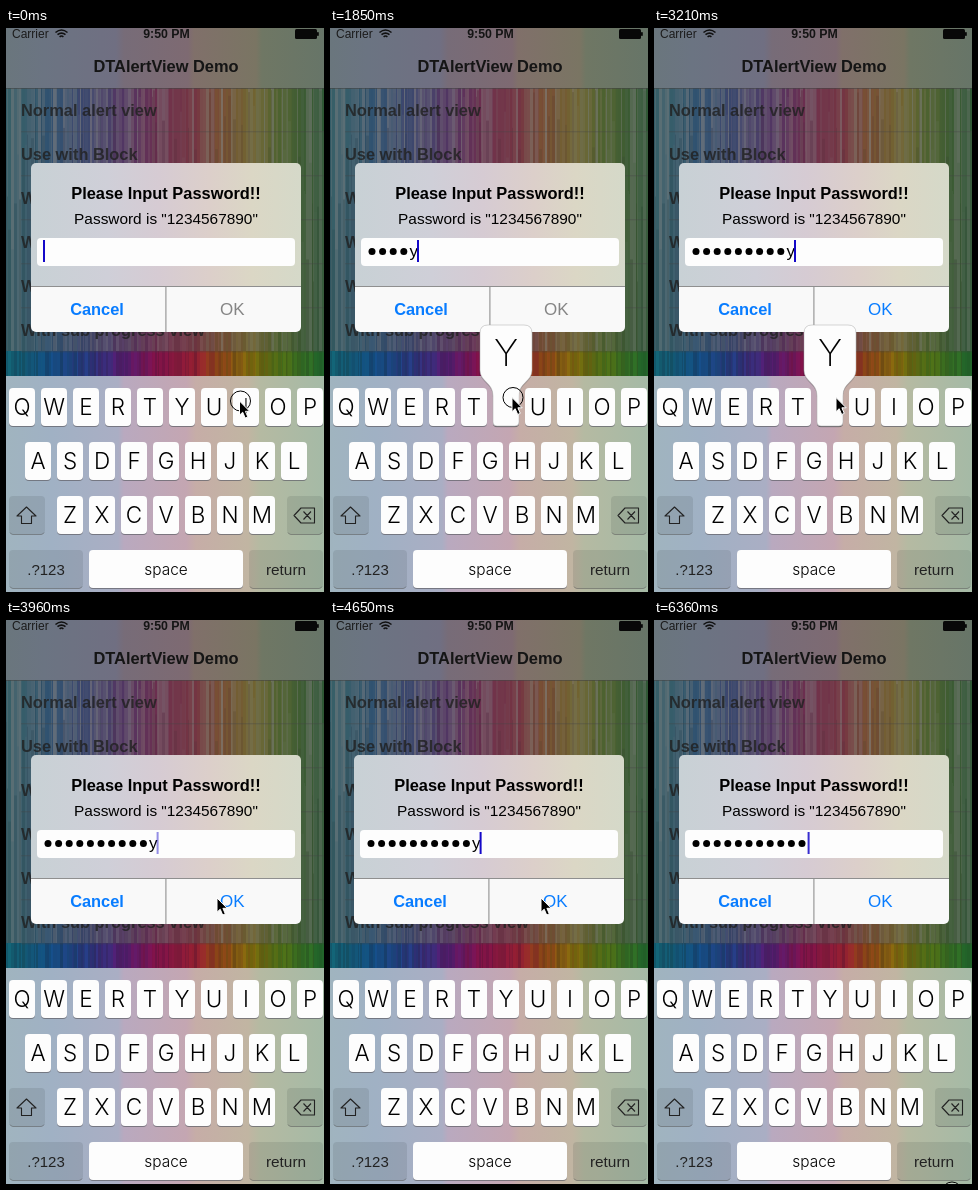
Write an HTML page that moves like this. It is 318 by 564 pixels and loops after 6420 ms.

```html
<!DOCTYPE html>
<html lang="en">
<head>
<meta charset="utf-8">
<title>DTAlertView Demo</title>
<style>
  html, body { margin: 0; width: 100%; height: 100%; overflow: hidden; }
  svg { display: block; width: 318px; height: 564px; font-family: "Liberation Sans", Arial, sans-serif; }
</style>
</head>
<body>
<svg id="stage" viewBox="0 0 318 564" xmlns="http://www.w3.org/2000/svg"></svg>
<script>
const LOOP = 6420;
const stage = document.getElementById('stage');

function add(parent, tag, attrs, content) {
  const node = document.createElementNS('http://www.w3.org/2000/svg', tag);
  for (const key in attrs) node.setAttribute(key, attrs[key]);
  if (content) node.textContent = content;
  parent.appendChild(node);
  return node;
}
const group = (parent = stage, attrs = {}) => add(parent, 'g', attrs);
const rect = (parent, x, y, width, height, fill, more) =>
  add(parent, 'rect', { x, y, width, height, fill, ...more });
const label = (parent, content, x, y, size, more) =>
  add(parent, 'text', { x, y, 'font-size': size, ...more }, content);
const centered = { 'text-anchor': 'middle' };
const bold = { 'font-weight': 700 };
const light = { 'font-family': 'Inter, Roboto, sans-serif', 'font-weight': 300 };

function gradient(id, stops) {
  const g = add(stage, 'linearGradient', { id });
  stops.forEach(([x, color]) => add(g, 'stop', { offset: x / 318, 'stop-color': color }));
  return `url(#${id})`;
}

let seed = 7;
function random() {
  seed = (seed * 16807) % 2147483647;
  return seed / 2147483647;
}

const lerp = (a, b, u) => a + (b - a) * u;

// Piecewise-linear track; each point is [time, ...values].
function track(points, t) {
  if (t <= points[0][0]) return points[0].slice(1);
  for (let i = 1; i < points.length; i++) {
    const a = points[i - 1], b = points[i];
    if (t < b[0]) {
      const u = (t - a[0]) / (b[0] - a[0]);
      return a.slice(1).map((v, k) => lerp(v, b[k + 1], u));
    }
  }
  return points[points.length - 1].slice(1);
}

function drawStripes() {
  const palette = [
    [0, 48, 92, 102], [45, 48, 82, 112], [85, 62, 66, 108], [115, 84, 52, 98],
    [150, 108, 46, 78], [190, 118, 54, 64], [212, 120, 78, 52], [245, 112, 102, 48],
    [275, 78, 98, 48], [318, 44, 86, 54]
  ];
  const mix = (color, tone, amount) =>
    `rgb(${color.map(v => Math.round(lerp(v, tone, amount)))})`;
  const saturate = (color, amount) => {
    const mean = (color[0] + color[1] + color[2]) / 3;
    return color.map(v => Math.max(0, mean + (v - mean) * amount));
  };
  const layer = group();
  for (let x = 0; x < 318;) {
    const width = 1 + Math.floor(random() * 3);
    const color = track(palette, x + random() * 12 - 6);
    const pale = random() ** 2 * 0.6;
    rect(layer, x, 60, width, 264, mix(color, 128, pale));
    const top = 60 + random() * 200;
    rect(layer, x, top, width, 324 - top, mix(color, random() < 0.5 ? 130 : 45, 0.25), { opacity: 0.45 });
    rect(layer, x, 323, width, 25, mix(saturate(color, 1.9), 20, random() * 0.25));
    x += width;
  }
}

function drawPage() {
  rect(stage, 0, 0, 318, 60, gradient('bar', [
    [0, '#6a767d'], [38, '#6b7482'], [110, '#706f82'], [118, '#776c78'],
    [182, '#7e6a72'], [188, '#80706a'], [250, '#7a7563'], [256, '#6f7764'], [318, '#677568']
  ]));
  rect(stage, 0, 60, 318, 0.6, '#444');
  label(stage, 'Carrier', 6, 10, 12, { fill: '#1c1c1c' });
  label(stage, '9:50 PM', 160.5, 10, 12.3, { ...centered, ...bold, fill: '#151515' });
  add(stage, 'path', {
    d: 'M49.5 4.5Q55.5 -.5 61.5 4.5M51.5 6.7Q55.5 3.4 59.5 6.7M53.6 8.8Q55.5 7.2 57.4 8.8',
    fill: 'none', stroke: '#111', 'stroke-width': 1.6
  });
  rect(stage, 289, 1, 22, 10, '#080808', { rx: 1.5 });
  rect(stage, 311, 4.2, 1.8, 3.6, '#080808');
  label(stage, 'DTAlertView Demo', 160, 44, 16.4, { ...centered, ...bold, fill: '#151515' });

  const rows = ['Normal alert view', 'Use with Block', 'W', 'W', 'W', 'With sub progress view'];
  rows.forEach((row, i) => {
    label(stage, row, 15, 88 + 44 * i, 16.4, { ...bold, fill: '#202020', opacity: 0.8 });
    rect(stage, 15, 103.5 + 44 * i, 303, 0.7, '#444', { opacity: 0.6 });
  });
}

function drawAlert() {
  const alert = group();
  add(alert, 'clipPath', { id: 'panel' }).innerHTML =
    '<rect x="25" y="135" width="270" height="169" rx="5"/>';
  const panel = group(alert, { 'clip-path': 'url(#panel)' });
  rect(panel, 25, 135, 270, 124, gradient('glass', [
    [0, '#c8d1d5'], [90, '#cfcfd8'], [150, '#d6cbd3'], [210, '#dccfca'], [260, '#dbd7c5'], [318, '#d5d9c9']
  ]));
  rect(panel, 25, 259, 270, 45, '#f9f9f9');
  rect(panel, 25, 258, 270, 1, '#8f8f8f');
  rect(panel, 159.3, 259, 1.2, 45, '#999');
  label(alert, 'Please Input Password!!', 160, 171, 16.4, { ...centered, ...bold });
  label(alert, 'Password is "1234567890"', 160, 196, 15.4, centered);
  rect(alert, 31, 210, 258, 28, '#fdfdfd', { rx: 4 });
  label(alert, 'Cancel', 91, 287, 16.4, { ...centered, ...bold, fill: '#087cff' });
  return alert;
}

function drawKey(x, y, width, content, size = 22.5) {
  rect(stage, x, y + 1, width, 38, '#65656c', { rx: 4, opacity: 0.75 });
  rect(stage, x, y, width, 38, '#fdfdfd', { rx: 4 });
  label(stage, content, x + width / 2, y + 19 + size * 0.36, size, { ...centered, ...light });
}

// Function keys only tint the board behind them.
function drawTintedKey(x, y, width, content = '', size = 15.4) {
  rect(stage, x, y, width, 38, '#20242c', { rx: 4, opacity: 0.11 });
  add(stage, 'path', {
    d: `M${x + 1} ${y + 36.5}q1 2 3 2h${width - 8}q2 0 3 -2`,
    fill: 'none', stroke: '#555', 'stroke-width': 0.9, opacity: 0.6
  });
  label(stage, content, x + width / 2, y + 24.5, size, { ...centered, fill: '#222' });
}

function drawKeyboard() {
  rect(stage, 0, 348, 318, 216, gradient('board', [
    [0, '#a0b4bf'], [45, '#a0b1c4'], [112, '#aaaec4'], [118, '#b9a9bf'],
    [180, '#c4a6b2'], [190, '#c6ada7'], [242, '#c1b5a2'], [254, '#b5baa2'], [318, '#a5baa6']
  ]));
  [['QWERTYUIOP', 3, 360], ['ASDFGHJKL', 19, 414], ['ZXCVBNM', 51, 468]].forEach(([letters, x, y]) =>
    [...letters].forEach((letter, i) => drawKey(x + 32 * i, y, 26, letter)));
  drawTintedKey(3, 468, 36);
  drawTintedKey(281, 468, 36);
  drawTintedKey(3, 522, 74, '.?123', 15);
  drawKey(83, 522, 154, 'space', 15.4);
  drawTintedKey(243, 522, 74, 'return');
  const line = { fill: 'none', stroke: '#222', 'stroke-width': 1.1, 'stroke-linejoin': 'round' };
  add(stage, 'path', { d: 'M20.5 479L30 488H25.5V495.5H15.5V488H11Z', ...line });
  add(stage, 'path', { d: 'M288 487.5L295 480H308.5V495H295ZM297.5 483.5L305 491.5M305 483.5L297.5 491.5', ...line });
}

function drawPopup() {
  const popup = group();
  const shape = 'M158 297H194Q202 297 202 305V342C202 354 189 354 189 368V394Q189 398 185 398H167' +
    'Q163 398 163 394V368C163 354 150 354 150 342V305Q150 297 158 297Z';
  add(popup, 'path', { d: shape, fill: '#444', opacity: 0.35, transform: 'translate(0 1.2)' });
  add(popup, 'path', { d: shape, fill: '#fdfdfd', stroke: '#aaa', 'stroke-width': 0.5 });
  label(popup, 'Y', 176, 338, 37, { ...centered, ...light, 'font-weight': 200 });
  return popup;
}

drawStripes();
drawPage();
const alertBox = drawAlert();
const okLabel = label(alertBox, 'OK', 226.3, 287, 17, centered);
const dots = Array.from({ length: 11 }, (_, i) =>
  add(alertBox, 'circle', { cx: 42 + 10.6 * i, cy: 223.6, r: 3.5 }));
const lastLetter = label(alertBox, 'y', 0, 229, 17);
const caret = rect(alertBox, 0, 212, 2, 22, '#1408c8');
drawKeyboard();
const popup = drawPopup();
const pointer = group();
const ring = add(pointer, 'circle', {
  cx: 1, cy: 0, r: 10, fill: '#fff', 'fill-opacity': 0.3, stroke: '#000', 'stroke-width': 1
});
add(pointer, 'path', {
  d: 'M0 0V14.2L3.2 11.2L5.7 17L8.3 15.9L5.9 10.3H10.2Z', fill: '#000', stroke: '#fff', 'stroke-width': 1
});

const taps = [900, 1130, 1340, 1560, 1800, 2040, 2310, 2600, 2810, 3040, 3250];
const maskTime = 5250;
const pointerPath = [
  [60, 233.5, 373], [300, 187, 370], [480, 187, 370], [540, 182, 369.5], [3620, 182, 369.5],
  [3760, 200, 318], [3900, 211, 278], [5060, 211, 278], [5290, 322, 330], [6309, 322, 330],
  [6310, 297, 572]
];
const caretFade = [
  [60, 1], [240, 0], [480, 0], [660, 1], [3620, 1], [3800, 0], [3880, 0], [4060, 1],
  [4370, 1], [4490, 0], [4520, 0], [4640, 1], [5060, 1], [5250, 0], [5830, 0], [6000, 1],
  [6310, 1], [6360, 0.85]
];

const show = (node, visible) => node.setAttribute('visibility', visible ? 'visible' : 'hidden');

function shake(t) {
  const u = (t - 4390) / 540;
  return u > 0 && u < 1 ? -6.5 * (1 - u) * Math.sin(6 * Math.PI * u) : 0;
}

function render(t) {
  const count = taps.filter(tap => tap <= t).length;
  const masked = t < maskTime ? Math.max(0, count - 1) : count;
  const sinceTap = count ? t - taps[count - 1] : Infinity;
  const textEnd = 37 + 10.6 * masked;

  dots.forEach((dot, i) => show(dot, i < masked));
  show(lastLetter, count > masked);
  lastLetter.setAttribute('x', textEnd);
  caret.setAttribute('x', textEnd + (count > masked ? 7.6 : 0));
  caret.setAttribute('opacity', track(caretFade, t)[0]);
  okLabel.setAttribute('fill', count >= 10 ? '#087cff' : '#858585');
  alertBox.setAttribute('transform', `translate(${Math.round(shake(t))} 0)`);

  show(popup, sinceTap < 190);
  show(ring, t < 60 || sinceTap < 165 || (t >= 4200 && t < 4370) || t >= 6310);
  pointer.setAttribute('transform', `translate(${track(pointerPath, t).join(' ')})`);
}

const start = performance.now();
function tick(now) {
  render(Math.max(0, now - start) % LOOP);
  requestAnimationFrame(tick);
}
render(0);
requestAnimationFrame(tick);
</script>
</body>
</html>
```
